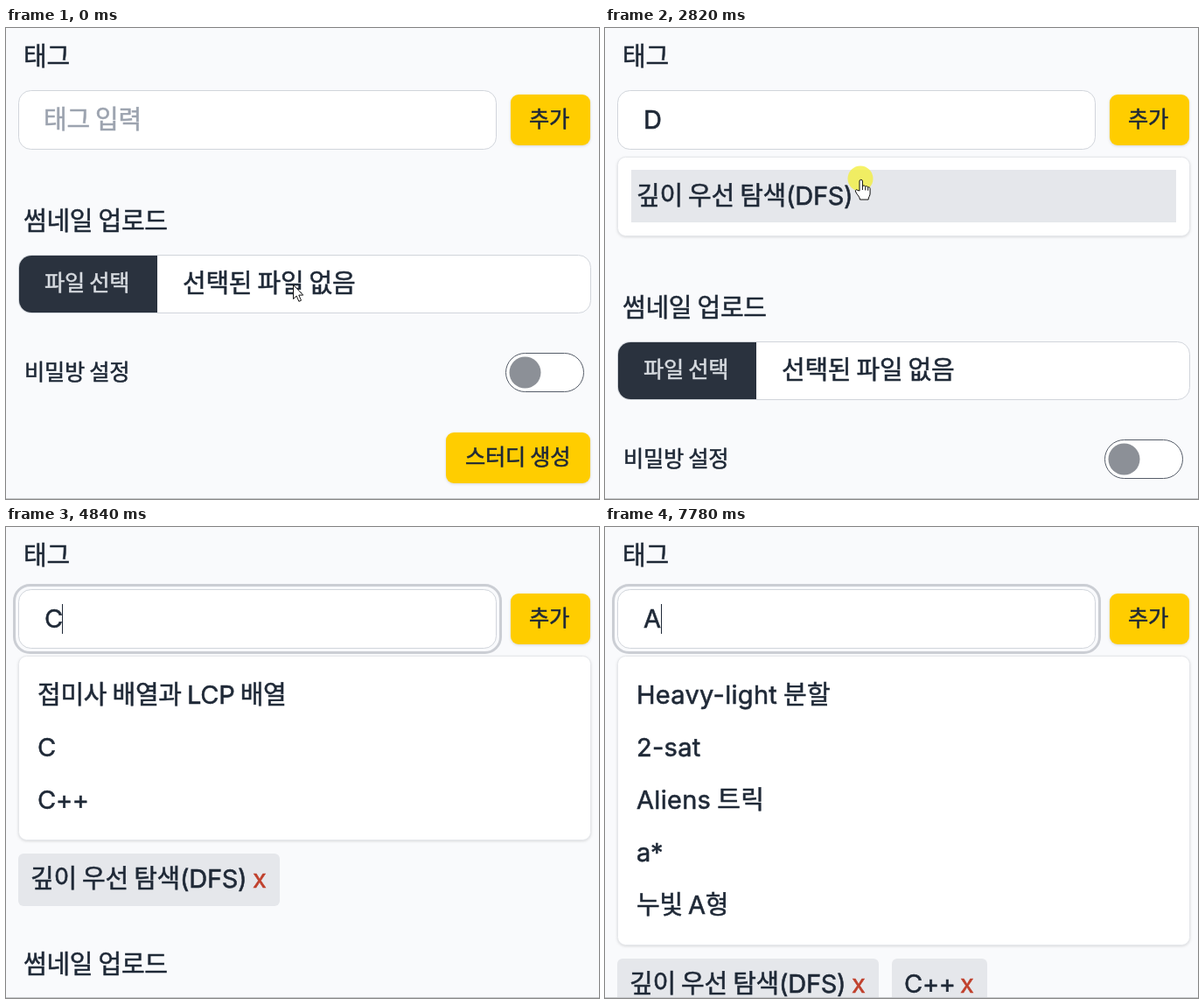
Animation, 678 px wide and 538 px high, one loop 8000 ms. Source, as an HTML page:

```html
<!DOCTYPE html>
<html lang="ko">
<head>
<meta charset="utf-8">
<title>태그 입력</title>
<style>
  html, body { margin: 0; width: 100%; height: 100%; overflow: hidden; background: #f9fafc; }
  svg { display: block; width: 678px; height: 538px; }
  text {
    font: 29px Inter, "Noto Sans CJK KR", "Noto Sans CJK", sans-serif;
    word-spacing: -1.5px; white-space: pre;
    color: #1f2937; fill: currentColor; stroke: currentColor; stroke-width: .55px;
  }
  .small { font-size: 25.3px; }
  .soft { filter: drop-shadow(0 1px 1.5px #0002); }
</style>
</head>
<body>
<svg id="stage" viewBox="0 0 678 538"></svg>
<script>
const LOOP = 8000, TICK = 78, BLINK = 500, CLICK = 140;
const DFS = '깊이 우선 탐색(DFS)';
const options = {
  D: [DFS],
  C: ['접미사 배열과 LCP 배열', 'C', 'C++'],
  A: ['Heavy-light 분할', '2-sat', 'Aliens 트릭', 'a*', '누빛 A형']
};
const START = [328, 293], ADD = [621, 99];

// Each gesture moves the pointer to a place and clicks there.
const gestures = [
  { from: 70, to: 312, at: [223, 77], click: 380 },
  { from: 2430, to: 2496, at: [293, 173], click: 2760 },
  { from: 3080, to: 3430, at: ADD, click: 3540 },
  { from: 3680, to: 4056, at: [288, 138], click: 4030 },
  { from: 5540, to: 5850, at: [263, 283], click: 6020 },
  { from: 6200, to: 6540, at: ADD, click: 6920 },
  { from: 7080, to: 7440, at: [300, 108], click: 7480 }
];
const keys = [
  { key: 'D', time: 1390 },
  { key: 'C', time: 4840, hidesPointer: true },
  { key: 'A', time: 7780, hidesPointer: true }
];

function pointerAt(time) {
  const t = Math.floor(time / TICK) * TICK;
  return gestures.reduce((p, g) => {
    const k = Math.min(1, Math.max(0, (t - g.from) / (g.to - g.from)));
    return p.map((v, i) => Math.round(v + (g.at[i] - v) * k));
  }, START);
}

const inside = ([x, y], left, top, w, h) => x >= left && x < left + w && y >= top && y < top + h;
const overField = p => inside(p, 14, 71, 547, 68);
const overAdd = p => inside(p, 577, 76, 91, 58);
const rowAt = (p, rows) => rows.findIndex((_, i) => inside(p, 30, 162 + 60 * i, 623, 60));
const rowsOf = s => s.open ? options[s.text] : [];

// What the form does in answer to a press, a release and a key.
function press(s, at) {
  return { ...s, focused: overField(at) };
}
function release(s, at) {
  const picked = rowsOf(s)[rowAt(at, rowsOf(s))];
  if (picked) return { ...s, text: picked, open: false };
  return overAdd(at) ? { ...s, text: '', tags: s.tags + 1 } : s;
}
const events = [
  ...gestures.flatMap(({ at, click }) => [
    { time: click, apply: s => press(s, at) },
    { time: click + CLICK, apply: s => release(s, at) }
  ]),
  ...keys.map(({ key, time }) => ({ time, apply: s => ({ ...s, text: key, open: true }) }))
].sort((a, b) => a.time - b.time);

function formAt(t) {
  return events.filter(e => e.time <= t).reduce(
    (s, e) => ({ ...e.apply(s), since: e.time }),
    { text: '', focused: false, open: false, tags: 0, since: 0 });
}

const box = (x, y, w, h, r, fill, extra = '') =>
  `<rect x="${x}" y="${y}" width="${w}" height="${h}" rx="${r}" fill="${fill}" ${extra}/>`;
const label = (x, y, s, extra = '') =>
  `<text x="${x}" y="${y}" letter-spacing="${/[a-z]{3}/.test(s) ? .3 : -.3}" ${extra}>${s}</text>`;
const shift = (y, content) => `<g transform="translate(0 ${y})">${content}</g>`;
const border = 'stroke="#d1d5db"';

const form =
  label(20, 231, '썸네일 업로드') +
  box(14.5, 259.5, 654, 66, 14, '#fff', border) +
  '<path d="M173 260V325H29a14 14 0 0 1-14-14V274a14 14 0 0 1 14-14z" fill="#2a323e"/>' +
  label(44, 300, '파일 선택', 'class="small" style="color:#d7dbe0"') +
  label(202, 302, '선택된 파일 없음') +
  label(21, 402, '비밀방 설정', 'class="small"') +
  box(571.5, 371.5, 89, 44, 22, '#fff', 'stroke="#565d69"') +
  '<circle cx="593.5" cy="393.5" r="18" fill="#8c9097"/>' +
  box(503, 462, 165, 58, 9, '#ffcd00', 'class="soft"') +
  label(525, 499, '스터디 생성', 'class="small"');

const tag = (x, w, s) =>
  box(x, 154, w, 60, 6, '#e5e7eb') + label(x + 14, 193, s) +
  label(x + w - 31, 193, 'x', 'style="color:#c0402c"');

const dropdown = (rows, hovered) =>
  box(14.5, 147.5, 654, 60 * rows.length + 30, 9, '#fff', 'stroke="#e5e7eb" class="soft"') +
  rows.map((s, i) => shift(60 * i,
    (i === hovered ? box(30, 162, 623, 60, 0, '#e5e7eb') : '') + label(36, 202, s))).join('');

const shapes = {
  arrow: '<path d="M.5.5V16.5l3.7-3.4 2.7 6.2 2.6-1.1-2.7-6.1h4.9z" fill="#fff" stroke="#111"/>',
  hand: '<path d="M-2 13V2a1.7 1.7 0 0 1 3.4 0V8c.3-1.6 3.2-1.4 3.3.4.5-1.2 2.9-.8 3 .8.6-.9 2.4-.4 2.4 1.2V16c0 3-2 4-2 7H-1.5c0-3-3-5-5-9-.8-2.2 1.2-3 2.4-1.6z" fill="#fff" stroke="#111"/><path d="M1.4 8v4M4.7 8.4v4M7.7 9.2v3.5" stroke="#111"/>',
  beam: '<path d="M-2.5-7.5h2l1 1 1-1h2M.5-6.5v14M-2.5 8h2l1-1 1 1h2" fill="none" stroke="#222"/>'
};

function pointer(t, p, onTarget) {
  const typed = keys.findLast(k => k.time <= t);
  const moved = gestures.findLast(g => g.from <= t);
  if (typed?.hidesPointer && typed.time > moved.from) return '';
  const shape = onTarget ? 'hand' : overField(p) ? 'beam' : 'arrow';
  const pressed = gestures.some(g => t >= g.click && t < g.click + CLICK);
  return `<g transform="translate(${p})">` +
    (pressed ? '<circle cx="-1" cy="-1" r="14.5" fill="#f4ee3c" opacity=".78"/>' : '') +
    shapes[shape] + '</g>';
}

function scene(t) {
  const s = formAt(t), p = pointerAt(t), rows = rowsOf(s);
  const row = rowAt(p, rows), onAdd = overAdd(p);
  const caretOn = s.focused && Math.floor((t - s.since) / BLINK) % 2 === 0;

  return box(0, 0, 678, 538, 0, '#f9fafc') +
    label(20, 43, '태그') +
    (s.focused ? box(9.5, 66.5, 556, 77, 18, 'none', 'stroke="#cbced4" stroke-width="3"') : '') +
    box(14.5, 71.5, 546, 67, 14, '#fff', border) +
    (s.text ? label(44, 115, s.text) : label(43, 115, '태그 입력', 'style="color:#9ca3af"')) +
    (caretOn ? box(s.text ? 64 : 45, 88, 1, 34, 0, '#1f2937') : '') +
    box(577, 76, 91, 58, 9, onAdd ? '#f7c600' : '#ffcd00', 'class="soft"') +
    label(598, 113, '추가', 'class="small"') +
    shift(s.open ? 39 + 60 * rows.length : 0,
      (s.tags > 0 ? tag(14, 299, DFS) : '') +
      (s.tags > 1 ? tag(328, 109, 'C++') : '') +
      shift(s.tags ? 60 : 0, form)) +
    (s.open ? dropdown(rows, row) : '') +
    box(0, 537, 678, 1, 0, '#c6c8cb') +
    pointer(t, p, row >= 0 || onAdd);
}

const stage = document.getElementById('stage');
let shown = '';
function draw(now) {
  const markup = scene(now % LOOP);
  if (markup !== shown) stage.innerHTML = shown = markup;
  requestAnimationFrame(draw);
}
draw(performance.now());
</script>
</body>
</html>
```
